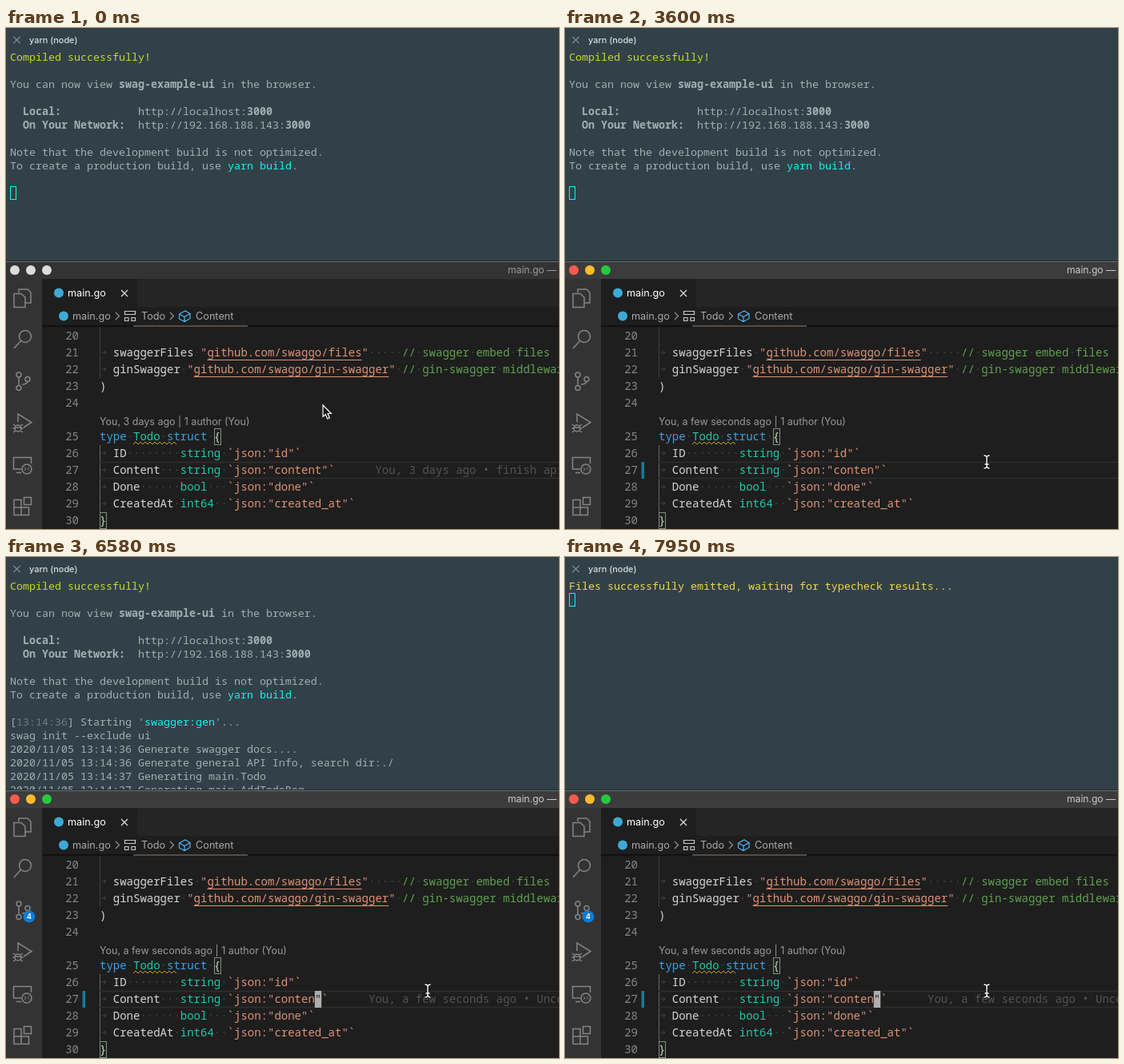
An HTML page for the animation above (8 s loop, 691 by 627 pixels).

```html
<!DOCTYPE html>
<html lang="en">
<head>
<meta charset="utf-8">
<title>Terminal and editor</title>
<style>
  html, body { margin: 0; width: 100%; height: 100%; overflow: hidden; background: #1e1e1e; }
  svg { display: block; }
  text { white-space: pre; }
  .term { font: 13.333px "Noto Sans Mono", monospace; fill: #a1afb1; }
  .code { font: 14px "Noto Sans Mono", monospace; fill: #d4d4d4; }
  .ui { font-family: Inter, sans-serif; }
  .icon { fill: none; stroke: #858585; stroke-width: 1.5; }
</style>
</head>
<body>
<svg id="stage" width="691" height="627" viewBox="0 0 691 627"></svg>
<script>
const LOOP = 8000, CELL = 8.4, LEFT = 117;
const C = {
  kw: '#3d9fe0', type: '#1fc7a6', str: '#dc9274', comment: '#5fa04e',
  fg: '#d4d4d4', cyan: '#18eef2', dim: '#6a7b82', lime: '#c5d92f', yellow: '#f0d550'
};
const esc = s => s.replace(/&/g, '&amp;').replace(/</g, '&lt;');
const rowY = n => 385 + 21 * (n - 20) + (n > 24 ? 21 : 0);
const rect = (x, y, w, h, fill, more = '') =>
  `<rect x="${x}" y="${y}" width="${w}" height="${h}" fill="${fill}" ${more}/>`;
const path = (d, more = '') => `<path d="${d}" ${more}/>`;
const ui = (x, y, size, fill, s, more = '') =>
  `<text class="ui" x="${x}" y="${y}" font-size="${size}" fill="${fill}" ${more}>${esc(s)}</text>`;

// A line is a string or a list of [style, text]; the style is a colour or 'bold'.
const spans = line => typeof line === 'string' ? esc(line) : line.map(([style, s]) =>
  `<tspan ${style === 'bold' ? 'font-weight="700"' : style ? `fill="${style}"` : ''}>${esc(s)}</tspan>`).join('');

/* ---------- terminal ---------- */
const intro = [
  [[C.lime, 'Compiled successfully!']],
  '',
  [['', 'You can now view '], ['bold', 'swag-example-ui'], ['', ' in the browser.']],
  '',
  [['bold', '  Local:'], ['', '            http://localhost:'], ['bold', '3000']],
  [['bold', '  On Your Network:'], ['', '  http://192.168.188.143:'], ['bold', '3000']],
  '',
  'Note that the development build is not optimized.',
  [['', 'To create a production build, use '], [C.cyan, 'yarn build'], ['', '.']],
  ''
];
const stamp = time => [['', '['], [C.dim, time], ['', '] ']];
const generate = [
  [...stamp('13:14:36'), ['', "Starting '"], [C.cyan, 'swagger:gen'], ['', "'..."]],
  'swag init --exclude ui',
  '2020/11/05 13:14:36 Generate swagger docs....',
  '2020/11/05 13:14:36 Generate general API Info, search dir:./',
  '2020/11/05 13:14:37 Generating main.Todo',
  '2020/11/05 13:14:37 Generating main.AddTodoReq'
];

const wrap = line => line.match(/.{1,88}/g);
const script = '[main] INFO  o.o.c.l.AbstractTypeScriptClientCodegen - ';
const host = "[main] WARN  o.o.codegen.utils.URLPathUtils - 'host' (OAS 2.0) or 'servers' (OAS 3.0) " +
  'not defined in the spec. Default to [http://localhost] for server URL [http://localhost/api/v1]';
const unnamed = (verb, id) => `[main] WARN  o.o.codegen.DefaultCodegen - Empty operationId found for path: ` +
  `${verb} /todos. Renamed to auto-generated operationId: ${id}`;
const written = ['models/MainTodo.ts', 'models/MainAddTodoReq.ts', 'models/index.ts', 'apis/DefaultApi.ts',
  'apis/index.ts', 'runtime.ts', 'index.ts', '.openapi-generator-ignore', '.openapi-generator/VERSION']
  .map(f => `[main] INFO  o.o.codegen.AbstractGenerator - writing file ./ui/src/api/${f}`);
const log = [
  'table.',
  script + `Hint: Environment variable 'TS_POST_PROCESS_FILE' (optional) not defined. E.g. to format the ` +
    `source code, please try 'export TS_POST_PROCESS_FILE="/usr/local/bin/prettier --write"' (Linux/Mac)`,
  script + "Note: To enable file post-processing, 'enablePostProcessFile' must be set to `true` " +
    '(--enable-post-process-file for CLI).',
  host, host, unnamed('get', 'todosGet'), unnamed('post', 'todosPost'), ...written
].flatMap(wrap);
const finished = [...stamp('13:14:39'), ['', "Finished '"], [C.cyan, 'swagger:gen'], ['', "' after 3.12 s"]];

const screens = [
  [0, intro],
  [4070, [...intro, ...generate.slice(0, 2)]],
  [4130, [...intro, ...generate.slice(0, 4)]],
  [4190, [...intro, ...generate.slice(0, 5)]],
  [4250, [...intro, ...generate]],
  [6930, log],
  [6990, log.slice(5)],
  [7050, log.slice(10)],
  [7470, [...log.slice(11), finished]],
  [7590, [[[C.yellow, 'Compiling...']]]],
  [7890, []],
  [7950, [[[C.yellow, 'Files successfully emitted, waiting for typecheck results...']]]]
];
const drawScreen = lines =>
  lines.slice(0, 16).map((l, i) => `<text class="term" x="5" y="${41 + 17 * i}">${spans(l)}</text>`).join('') +
  (lines.length < 16
    ? rect(5.5, 198.5 - 170 + 17 * lines.length, 7, 16, 'none', `stroke="${C.cyan}"`) : '');

/* ---------- editor ---------- */
function codeLine(n, col, parts) {
  const x = LEFT + col * CELL, y = rowY(n) + 5;
  const plain = parts.map(p => p[1]).join('');
  const dots = plain.replace(/\S/g, '_').replace(/ /g, '·').replace(/_/g, ' ');
  return `<text class="code" x="${x}" y="${y}" fill="#434343" style="fill:#434343">${dots}</text>` +
    `<text class="code" x="${x}" y="${y}">${spans(parts)}</text>` +
    (col ? path(`M119.5 ${y - 5}h5.5m-2.5 -2.5l2.5 2.5l-2.5 2.5`, 'fill="none" stroke="#434343"') : '');
}
const importLine = (n, name, url, gap, note) => {
  const x = LEFT + (name.length + 4) * CELL;
  return codeLine(n, 2, [[C.fg, name + ' '], [C.str, `"${url}"`], [C.comment, ' '.repeat(gap) + note]]) +
    rect(x, rowY(n) + 9, url.length * CELL, 1, C.str);
};
const field = (n, name, type, tag) =>
  codeLine(n, 2, [[C.fg, name.padEnd(10)], [C.type, type.padEnd(7)], [C.str, '`json:"' + tag + '"`']]);
const highlight = n => path(`M117 ${rowY(n) - 9.5}H691M117 ${rowY(n) + 10.5}H691`, 'stroke="#2d2d2d" stroke-width="1.5"');
const ghost = (n, col, s) =>
  `<text class="code" x="${LEFT + col * CELL}" y="${rowY(n) + 5}" style="fill:#535353">${s}</text>`;
const block = (n, col, ch = '') => rect(LEFT + col * CELL, rowY(n) - 10, 8.4, 21, '#aeafad') +
  `<text class="code" x="${LEFT + col * CELL}" y="${rowY(n) + 5}" style="fill:#1e1e1e">${ch}</text>`;
const group = (id, body) => `<g id="${id}">${body}</g>`;

let squiggle = 'M159 521';
for (let i = 0; i < 18; i++) squiggle += `l3 ${i % 2 ? 3 : -3}`;

const numbers = Array.from({ length: 11 }, (_, i) =>
  `<text class="code" text-anchor="end" x="91" y="${rowY(20 + i) + 5}" style="fill:#858585">${20 + i}</text>`).join('');
const box = (x, y) => rect(x + .5, y + .5, 8, 20, 'rgba(0,100,0,.12)', 'stroke="#888"');
const cross = (x, y, r, color) =>
  path(`M${x - r} ${y - r}l${2 * r} ${2 * r}m0 ${-2 * r}l${-2 * r} ${2 * r}`, `fill="none" stroke="${color}" stroke-width="1.2"`);
const chevron = x => path(`M${x - 2} 356l4.5 4.5l-4.5 4.5`, 'fill="none" stroke="#999" stroke-width="1.1"');
const dot = (x, y, r, fill, id = '') => `<circle id="${id}" cx="${x}" cy="${y}" r="${r}" fill="${fill}"/>`;

const activityIcons = `<g class="icon">
  <path d="M16 331V327H27L31 331V344H24M10 332.500H19L24 337V349.500H10Z"/>
  <circle cx="24" cy="386" r="7.500"/><path d="M18.500 391.500L10 401"/>
  <circle cx="16" cy="434" r="3"/><circle cx="27" cy="439.500" r="3"/><circle cx="16" cy="450.500" r="3"/>
  <path d="M16 437V447.500M27 442.500Q26 446 20 446"/>
  <path d="M15 493V483L32 493.500L22 500"/><circle cx="15" cy="501" r="4"/>
  <path d="M9 496l3 2m6 0l3 -2M8.500 501h2.500m8 0h2.500M9 506l3 -2m6 0l3 2M11 500h8"/>
  <path d="M19 552H9.500V537.500H31.500V545M13 556.500H19"/><circle cx="26" cy="552" r="6"/>
  <path d="M23 550l2 2l-2 2M29 549.500l-2 2l2 2" stroke-width="1"/>
  <path d="M10 590.500H19V609.500H10ZM10 600H28.500V609.500H19M22.500 587.500H31.500V596.500H22.500Z"/></g>`;

const windowChrome =
  rect(0, 291, 691, 1, '#202a2f') + rect(0, 292, 691, 335, '#1e1e1e') +
  `<rect id="bar" y="292" width="691" height="22"/>` + rect(0, 292, 691, 1, '#6a6f72') +
  [11, 31, 51].map((x, i) => dot(x, 303, 6, '', 'light' + i)).join('') + dot(11, 303, 2, '#7d1510', 'unsavedLight') +
  ui(627, 307, 12.1, '#ccc', 'main.go —', 'id="title"') +
  rect(0, 314, 45, 313, '#333') + activityIcons +
  group('badge', dot(29, 450, 7.5, '#0a7bd6') +
    group('clock', path('M29 446.500V450.500L31.500 452', 'fill="none" stroke="#fff" stroke-width="1.2"') +
      '<circle cx="29" cy="450" r="5" fill="none" stroke="#fff"/>') +
    ui(29, 453.4, 9.5, '#fff', '4', 'id="count" text-anchor="middle" font-weight="600"')) +
  rect(45, 314, 646, 35, '#252526') + rect(45, 314, 119, 35, '#1e1e1e') +
  dot(66, 331.5, 6, '#3fa9d4') + ui(77, 336, 12.7, '#fff', 'main.go') +
  group('close', cross(148, 332, 4, '#e0e0e0')) + dot(148, 332, 4.5, '#ddd', 'unsavedTab') +
  dot(72, 360.5, 6, '#3fa9d4') + ui(83, 365, 12.7, '#a9a9a9', 'main.go') + chevron(139) +
  ui(147, 365, 12.7, '#a9a9a9', '...', 'id="crumbShort"') +
  group('crumbLong',
    path('M148.500 354.500h13v4h-13zM148.500 362.500h4.500v4h-4.500zM157 362.500h4.500v4h-4.500z', 'fill="none" stroke="#c8c8c8" stroke-width="1.2"') +
    ui(169, 365, 12.7, '#a9a9a9', 'Todo') + chevron(207) +
    path('M216.500 358l7.500 -4l6 3.500v6l-7 4l-6.500 -3.500zl6.500 3.500l7 -4m-7 4v6', 'fill="none" stroke="#55b3f0" stroke-width="1.2"') +
    ui(237, 365, 12.7, '#a9a9a9', 'Content'));

const editor =
  rect(45, 372, 646, 3, 'url(#shade)') + rect(159, 372.5, 143, 1, '#a08577') +
  rect(117, 374, 1, 64, '#404040') + `<rect id="guide" x="117" y="522" width="1" height="84"/>` +
  numbers +
  group('at24', highlight(24) + ghost(24, 6, 'You, 3 days ago • init backend')) +
  group('at27', highlight(27) + box(260, 501) + box(117, 606)) +
  group('oldNote', ghost(27, 41, 'You, 3 days ago • finish api')) +
  group('newNote', ghost(27, 40, 'You, a few seconds ago • Uncommitted changes')) +
  importLine(21, 'swaggerFiles', 'github.com/swaggo/files', 5, '// swagger embed files') +
  importLine(22, 'ginSwagger', 'github.com/swaggo/gin-swagger', 1, '// gin-swagger middleware') +
  codeLine(23, 0, [[C.fg, ')']]) +
  ui(117, 496.5, 12.5, '#999', '', 'id="lens"') +
  codeLine(25, 0, [[C.kw, 'type '], [C.type, 'Todo '], [C.kw, 'struct '], [C.fg, '{']]) +
  path(squiggle, 'fill="none" stroke="#c9a21a" stroke-width="1"') +
  field(26, 'ID', 'string', 'id') +
  group('before', field(27, 'Content', 'string', 'content')) +
  group('after', field(27, 'Content', 'string', 'conten') + rect(95.5, 543, 3.5, 21, '#0c7d9d')) +
  field(28, 'Done', 'bool', 'done') + field(29, 'CreatedAt', 'int64', 'created_at') +
  codeLine(30, 0, [[C.fg, '}']]) +
  group('caret24', block(24, 0)) + group('caretT', block(27, 32, 't')) + group('caretQ', block(27, 32, '"'));

const beam = 'M-3.500 -8Q0 -8 0 -5Q0 -8 3.500 -8M0 -5V5Q0 8 -3.500 8M0 5Q0 8 3.500 8M-2.500 3H2.500';
const pointers =
  path('M0 0V14.500L3.300 11.500L5.600 17L8.300 15.900L6 10.500H10.300Z',
    'id="arrow" fill="#111" stroke="#fff" stroke-width="1.2" transform="translate(396 472)"') +
  group('beam', path(beam, 'fill="none" stroke="#111" stroke-width="3"') + path(beam, 'fill="none" stroke="#fff" stroke-width="1.4"'));

const stage = document.getElementById('stage');
stage.innerHTML =
  `<defs><linearGradient id="shade" x2="0" y2="1"><stop stop-color="#0a0a0a"/>
   <stop offset="1" stop-color="#1e1e1e"/></linearGradient></defs>` +
  rect(0, 0, 691, 292, '#324148') + cross(13.5, 15, 4.2, '#87949a') +
  ui(29, 19, 10.9, '#d8dee0', 'yarn (node)', 'font-weight="500"') +
  group('screen', '') + windowChrome + editor + pointers;

/* ---------- timing ---------- */
const $ = id => document.getElementById(id);
const show = (id, on) => $(id).setAttribute('display', on ? 'inline' : 'none');
const paint = (id, fill) => $(id).setAttribute('fill', fill);
const toggled = (t, times) => times.filter(x => t >= x).length % 2 === 1;

const track = [
  [960, 396, 475], [1440, 396, 475], [1620, 356, 518], [1900, 424, 567],
  [2200, 390, 555], [2430, 389, 554], [2680, 389, 554], [2950, 527, 543]
];
function mouseAt(t) {
  const i = track.findIndex(k => k[0] > t);
  if (i < 0) return track[track.length - 1].slice(1);
  if (i === 0) return track[0].slice(1);
  const [a, b] = [track[i - 1], track[i]];
  const u = (t - a[0]) / (b[0] - a[0]), e = u * u * (3 - 2 * u);
  return [1, 2].map(j => a[j] + (b[j] - a[j]) * e);
}

let shown = -1;
function render(t) {
  const current = screens.filter(s => t >= s[0]).length - 1;
  if (current !== shown) $('screen').innerHTML = drawScreen(screens[shown = current][1]);

  const active = t >= 960, onLine24 = t >= 1020 && t < 2670;
  const edited = t >= 3190, unsaved = edited && t < 3600;
  const longCrumb = t < 1140 || t >= 2730;
  const caret = toggled(t, [2670, 3130, 3190, 3300, 3650, 4130, 4610, 5090, 5620, 6100, 6580, 7050, 7590]);

  paint('bar', active ? '#3c3c3c' : '#333');
  paint('title', active ? '#ccc' : '#999');
  ['#ff5a4f', '#fdbb2d', '#27c83f'].forEach((c, i) => paint('light' + i, active ? c : '#dcdcdc'));
  show('unsavedLight', unsaved);
  show('unsavedTab', unsaved);
  show('close', !unsaved);
  show('crumbLong', longCrumb);
  show('crumbShort', !longCrumb);
  paint('guide', onLine24 ? '#404040' : '#686868');

  show('at24', onLine24);
  show('at27', !onLine24);
  show('oldNote', t < 1020 || t >= 2850 && t < 3130);
  show('newNote', t >= 4190);
  show('before', !edited);
  show('after', edited);
  $('lens').textContent = `You, ${t < 3600 ? '3 days' : 'a few seconds'} ago | 1 author (You)`;
  show('caret24', t < 2670 && toggled(t, [1080, 1500, 1980, 2430]));
  show('caretT', caret && !edited);
  show('caretQ', caret && edited);

  show('badge', t >= 5440);
  show('clock', t < 5920);
  show('count', t >= 5920);

  show('arrow', !active);
  show('beam', active);
  $('beam').setAttribute('transform', `translate(${mouseAt(t).join(' ')})`);
}

const start = performance.now();
(function tick() {
  render((performance.now() - start) % LOOP);
  requestAnimationFrame(tick);
})();
</script>
</body>
</html>
```
